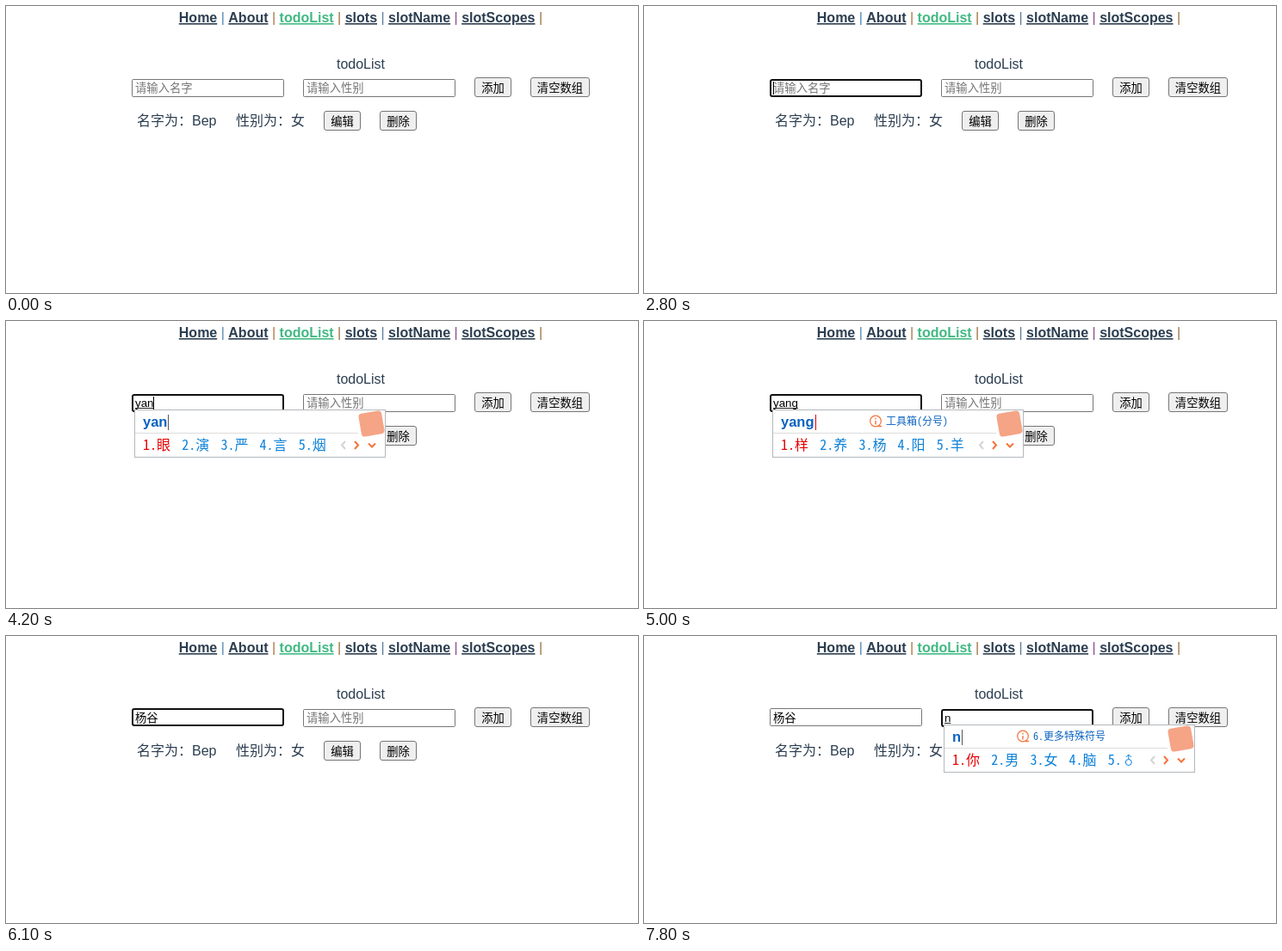
An HTML page that plays this animation: 734x334 px, repeating every 8000 ms.

```html
<!DOCTYPE html>
<html lang="zh-CN">
<head>
<meta charset="utf-8">
<title>todoList</title>
<style>
  html, body { margin: 0; width: 100%; height: 100%; overflow: hidden; background: #fff; }
  svg { display: block; }
  text { white-space: pre; font-family: "Liberation Sans", "Noto Sans CJK SC", "Noto Sans CJK", sans-serif; }
  .page { font-size: 16px; fill: #2c3e50; }
  .link { font-weight: bold; text-decoration: underline; }
  .colon { font-family: "Noto Sans CJK JP", "Noto Sans CJK", sans-serif; }
  .form { font-size: 13.333px; fill: #000; }
  .hint { fill: #757575; }
  .pre { font-size: 16.5px; font-weight: bold; fill: #0a62c0; }
  .cand, .tip { font-family: "Noto Sans Mono CJK SC", "Noto Sans CJK SC", "Noto Sans CJK", monospace; font-weight: 300; }
  .cand { font-size: 16px; }
  .tip { font-size: 12px; fill: #0a62c0; font-weight: 400; }
</style>
</head>
<body>
<svg id="stage" width="734" height="334" viewBox="0 0 734 334"></svg>
<script>
const LOOP = 8000;
const stage = document.getElementById('stage');

const BUTTON = {
  idle: ['#efefef', '#767676'],
  hover: ['#e5e5e5', '#4f4f4f'],
  press: ['#f5f5f5', '#8d8d8d']
};

// Each entry holds from its start time until the next one.
const TYPING = [
  { at: 3900, end: 4100, x: 149, pre: 'y', cands: '也要有元①' },
  { at: 4100, end: 4200, x: 149, pre: 'ya', cands: '呀压牙亚雅' },
  { at: 4200, end: 4400, x: 149, pre: 'yan', cands: '眼演严言烟' },
  { at: 4400, end: 5400, x: 149, pre: 'yang', cands: '样养杨阳羊',
    tip: '工具箱(分号)', tipX: 120, tipAt: 4700, caretOff: 4900 },
  { at: 5400, end: 5600, x: 149, pre: "yang'g", cands: '杨谷阳光洋葛样高养狗', size: 2 },
  { at: 7100, end: 8000, x: 348, pre: 'n', cands: '你男女脑♂',
    tip: '6.更多特殊符号', tipX: 92, tipAt: 7500, caretOff: 7600 }
];

const during = (t, a, b) => t >= a && t < b;
const text = (cls, x, y, str, attrs = '') => `<text class="${cls}" x="${x}" y="${y}" ${attrs}>${str}</text>`;
const rect = (x, y, w, h, attrs) => `<rect x="${x}" y="${y}" width="${w}" height="${h}" ${attrs}/>`;
const path = (d, color, width) => `<path d="${d}" fill="none" stroke="${color}" stroke-width="${width}"/>`;
const caret = (x, y, h, color) => rect(x, y, 1, h, `fill="${color}"`);

const ruler = document.createElement('canvas').getContext('2d');
function widthOf(str, font) {
  ruler.font = font + ' "Liberation Sans", Arial, sans-serif';
  return ruler.measureText(str).width;
}

function nav() {
  const names = ['Home', 'About', 'todoList', 'slots', 'slotName', 'slotScopes'];
  const bars = ['#4b84b5', '#a8743c', '#a06f3a', '#5a7a9c', '#8a4a8a', '#96703c'];
  const items = names.map((name, i) =>
    `<tspan class="link" fill="${i === 2 ? '#42b983' : '#2c3e50'}">${name}</tspan>` +
    `<tspan fill="${bars[i]}"> | </tspan>`);
  return text('page', 200.8, 19, items.join(''));
}

function button(x, y, w, label, look = 'idle') {
  const [fill, line] = BUTTON[look];
  return rect(x + .5, y + .5, w - 1, 22, `rx="2.5" fill="${fill}" stroke="${line}"`) +
    text('form', x + w / 2, y + 17, label, 'text-anchor="middle"');
}

function field(x, y, o) {
  const box = o.focus
    ? rect(x + 1, y + 1, 175, 19, 'rx="2" fill="#fff" stroke="#101010" stroke-width="2"')
    : rect(x + .5, y + .5, 176, 20, `rx="1" fill="#fff" stroke="${o.hover ? '#4f4f4f' : '#767676'}"`);
  const label = o.value ? text('form', x + 4, 100, o.value)
    : o.pre ? '' : text('form hint', x + 4, 100, o.hint);
  let out = box + label;
  let end = x + 4 + (o.value ? 27 : 0);
  if (o.pre) {
    const w = widthOf(o.pre, '13.333px');
    out += text('form', x + 4, 100, o.pre) + rect(x + 4, 101, w, 1, 'fill="#222"');
    end += Math.round(w);
  }
  return out + (o.caret ? caret(end, 88, 15, '#000') : '');
}

function candidates(s) {
  const size = s.size || 1;
  let out = '';
  for (let i = 0; i < 5; i++) {
    const x = s.x + 10 + i * (29.2 + 16 * size);
    const word = s.cands.substr(i * size, size);
    const color = i ? '#0a80d8' : '#e60000';
    const male = word === '♂';
    out += text('cand', x, 150, `${i + 1}.${male ? '' : word}`, `fill="${color}"`);
    if (male) {
      const cx = x + 24;
      out += `<circle cx="${cx}" cy="147" r="3.5" fill="none" stroke="${color}"/>` +
        path(`M${cx} 143.5V138M${cx - 3} 141l3-3l3 3`, color, 1);
    }
  }
  return out;
}

function tip(s, t) {
  if (!s.tip || t < s.tipAt) return '';
  const alpha = Math.min(1, (Math.floor((t - s.tipAt) / 100) + 1) / 4);
  const x = s.x + s.tipX;
  return `<g opacity="${alpha}"><circle cx="${x}" cy="116.5" r="6.3" fill="none" stroke="#f4743b" stroke-width="1.2"/>` +
    path(`M${x} 113v1.5M${x} 116v4.5M${x + 3} 122.5h4`, '#f4743b', 1.4) +
    text('tip', x + 12, 121, s.tip) + '</g>';
}

function inputPanel(s, t) {
  const w = 212 + 80 * (s.size || 1);
  const right = s.x + w;
  const preEnd = Math.round(s.x + 11 + widthOf(s.pre, 'bold 16.5px'));
  const red = s.pre === 'yang' && t >= 4900;
  return rect(s.x + .5, 103.5, w - 1, 55, 'fill="#fff" stroke="#b4b8bc"') +
    rect(s.x + 1, 130, w - 33, 1, 'fill="#dcdcdc"') +
    text('pre', s.x + 10, 123, s.pre) +
    caret(preEnd, 109, 18, red ? '#e60000' : '#555') +
    tip(s, t) + candidates(s) +
    path(`M${right - 47} 140l-4 4.500l4 4.500`, '#d4d4d4', 2) +
    path(`M${right - 36} 140l4 4.500l-4 4.500`, '#f4743b', 2) +
    path(`M${right - 20} 142.500l4 4l4-4`, '#f4743b', 2) +
    rect(right - 30, 106, 27, 27, `rx="4" fill="#f5a486" transform="rotate(-10 ${right - 16.5} 119.5)"`);
}

function scene(t) {
  const s = TYPING.find(k => during(t, k.at, k.end));
  const named = t >= 5600;
  const second = t >= 6300;
  const typingCaret = s && !(t >= s.caretOff);
  const clear = during(t, 900, 1100) ? 'press' : during(t, 800, 2300) ? 'hover' : 'idle';
  const colon = '<tspan class="colon">:</tspan>'.replace(':', '：');

  const first = {
    hint: '请输入名字',
    value: named ? '杨谷' : '',
    hover: during(t, 2400, 2800),
    focus: during(t, 2800, 6300),
    pre: s && !second ? s.pre : '',
    caret: !second && (typingCaret || during(t, 2800, 3300) || during(t, 3700, 3900) || during(t, 5600, 6100))
  };
  const other = {
    hint: '请输入性别',
    focus: second,
    pre: s && second ? s.pre : '',
    caret: second && (typingCaret || t < 6700)
  };

  return nav() +
    text('page', 412, 73, 'todoList', 'text-anchor="middle"') +
    field(146, named ? 84 : 85, first) +
    field(345, 85, other) +
    button(544, 83, 43, '添加') +
    button(609, 83, 69, '清空数组', clear) +
    text('page', 152, 139, `名字为${colon}Bep`) +
    text('page', 267, 139, `性别为${colon}女`) +
    button(369, 122, 43, '编辑') +
    button(434, 122, 43, '删除') +
    (s ? inputPanel(s, t) : '');
}

let shown = '';
const start = performance.now();
function draw() {
  const next = scene((performance.now() - start) % LOOP);
  if (next !== shown) stage.innerHTML = shown = next;
  requestAnimationFrame(draw);
}
draw();
</script>
</body>
</html>
```
